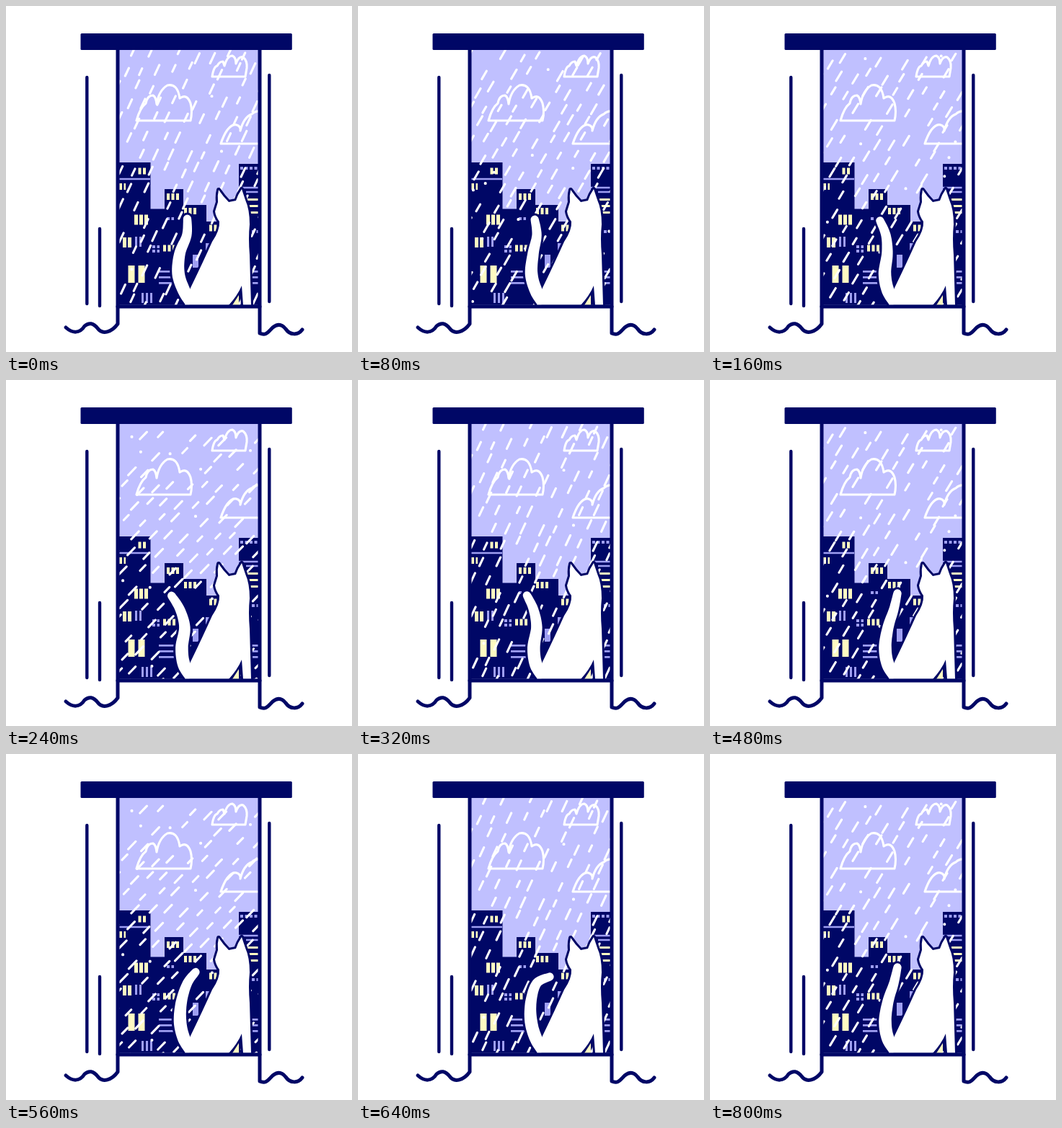
These frames come from a looping animation (480 by 480 pixels, 0.88 s). An HTML page:

```html
<!DOCTYPE html>
<html lang="en">
<head>
<meta charset="utf-8">
<title>Rainy window</title>
<style>
html, body { margin: 0; width: 100%; height: 100%; overflow: hidden; background: #fff; }
svg { display: block; width: 100vw; height: 100vh; }
path { stroke-linejoin: round; }
.navy { fill: #000766; }
.frame, .curtain { fill: none; stroke: #000766; stroke-width: 5; stroke-linecap: round; }
.curtain { stroke-width: 4.4; }
.cloud, .rain { fill: none; stroke: #fff; stroke-width: 3.1; stroke-linecap: round; }
.edge { fill: #000766; stroke: #000766; stroke-width: 6; }
.fur { fill: #fff; }

/* Windows are dashed strokes: stroke width is the height, dashes the panes */
.cream { stroke: #fffbc2; }
.lilac { stroke: #9f9ff2; }
.small { stroke-width: 9; stroke-dasharray: 4 2.5; }
.tall { stroke-width: 14; stroke-dasharray: 5 2; }
.big { stroke-width: 24; stroke-dasharray: 9 5; }
.dots { stroke-width: 4; stroke-dasharray: 4 2.5; }
.bars { stroke-width: 14; stroke-dasharray: 3 3; }
.ledge { stroke-width: 2.5; }
.door { stroke-width: 8; }
.blind { stroke-width: 27; stroke-dasharray: 2.8 5.2; }
.shutter { stroke-width: 16; stroke-dasharray: 3 6; }
</style>
</head>
<body>
<svg viewBox="0 0 480 480">
  <defs>
    <clipPath id="pane"><rect x="157" y="61" width="193.5" height="353.8"/></clipPath>
    <path id="body" d="M256 391 Q273 356 286 327 Q297 311 296 299 Q291 292 290 285 L294 272 Q293 263 295 255 Q301 264 309 272 L319 270 Q322 261 327 254 L332 269 Q338 282 338 303 Q336 322 338 345 L340 415 H329 L327 388 Q321 402 309 415 H248 Z"/>
    <path id="tail"/>
  </defs>
  <g clip-path="url(#pane)">
    <rect x="155" y="59" width="198" height="358" fill="#c0c0ff"/>
    <path class="navy" d="M155 217H200.5V281.5H220V254H246V276H278V299H323V219H353V417H155Z"/>
    <path class="cream small" d="M183.5 229h11M157 250.5h9M223 264.5h17M247 284.5h17M282 308h11M218 336h17"/>
    <path class="cream tall" d="M178 296.5h19M162 328h12"/>
    <path class="cream big" d="M169.5 372h23"/>
    <path class="cream shutter" d="M343 267v21"/>
    <path class="lilac dots" d="M325 225h24M203 334h10M203 340h10M223 295h10M341 313h10"/>
    <path class="lilac bars" d="M188 405h15M179 327h9"/>
    <path class="lilac ledge" d="M157 240h43M323 252h28M333 258h18"/>
    <path class="lilac door" d="M263 345v18M281 329v18"/>
    <path class="lilac blind" d="M225.5 367v19M351.5 367v19"/>
    <path class="cloud" d="M181 159 Q186 141 194 135 Q196 124 204 124 Q208 126 209 136 Q212 117 224 110 Q238 107 241 128 Q251 121 256 135 Q259 146 256 159 Z"/>
    <path class="cloud" d="M286 98 Q288 84 293 83 Q296 77 301 77 L303 83 Q307 69 314 69 Q319 71 319 80 Q323 69 329 71 Q335 76 334 86 L332 98 Z"/>
    <path class="cloud" d="M353 191 H298 Q302 179 307 172 Q314 163 320 165 Q326 167 325 173 Q330 154 341 150 Q346 145 353 146"/>
    <path class="rain" id="rain"/>
    <use href="#tail" class="edge"/>
    <use href="#body" class="edge"/>
    <use href="#tail" class="fur"/>
    <use href="#body" class="fur"/>
    <path fill="#fffbc2" d="M314 415 L323 401 V415 Z"/>
  </g>
  <rect class="navy" x="103.5" y="38" width="293.3" height="23" rx="1.5"/>
  <path class="frame" d="M155 61 V441 C147 452 134 457 127 447 Q118 436 109 444 C102 455 92 454 83 446"/>
  <path class="frame" d="M352 61 V454 C361 458 364 452 370 446 Q380 438 388 448 C394 457 405 457 411 449"/>
  <path class="frame" d="M155 417 H352"/>
  <path class="curtain" d="M112.3 99 V413 M130 309 V416 M365.3 96 V410"/>
</svg>
<script>
const STEP = 80, COUNT = 11;
const rain = document.getElementById('rain');
const tail = document.getElementById('tail');

const mix = (a, b, t) => a + (b - a) * t;
const smooth = t => t * t * (3 - 2 * t);
const point = (x, y) => `${x.toFixed(1)} ${y.toFixed(1)}`;

function random(seed) {
  return () => (seed = (seed * 16807) % 2147483647) / 2147483647;
}

// A jittered, staggered grid of slanted drops; some shrink to dots
function rainPath(degrees, sheet) {
  const rnd = random(7919e3 * (sheet + 3));
  const dx = -15 * Math.sin(degrees * Math.PI / 180);
  const dy = 15 * Math.cos(degrees * Math.PI / 180);
  let d = '';
  for (let row = 0; row < 16; row++) {
    for (let col = -1; col < 10; col++) {
      const x = 156 + col * 22 + (row * 13 + sheet * 6) % 22 + rnd() * 8 - 4;
      const y = 60 + row * 23 + sheet * 5 + rnd() * 12 - 6;
      const size = mix(0.6, 1.05, rnd()), kind = rnd();
      if (kind < 0.12) continue;
      d += 'M' + point(x, y) + (kind < 0.2 ? 'h.8v.8h-.8z' : 'l' + point(dx * size, dy * size));
    }
  }
  return d;
}

// Tail poses: tip x and y, then x of the centre line at three heights
const HEIGHTS = [318, 343, 371];
const rest = [252, 295, 251, 241, 239];
const left = [229, 299, 241, 248, 244];
const up = [260, 296, 255, 247, 243];
const curl = [266, 309, 248, 240, 240];
const sway = [[-0.3, rest], [3.3, left], [6, up], [8, curl], [10, up], [10.7, rest], [COUNT, rest]];

function poseAt(step) {
  const i = sway.findIndex(([time]) => time > step);
  const [t0, a] = sway[i - 1], [t1, b] = sway[i];
  const t = smooth((step - t0) / (t1 - t0));
  return a.map((v, n) => mix(v, b[n], t));
}

const spline = (a, b, c, d, t) =>
  b + t * (c - a + t * (2 * a - 5 * b + 4 * c - d + t * (3 * (b - c) + d - a))) / 2;

// Tapered outline around a smooth centre line
function tailPath([tipX, tipY, ...xs]) {
  const knots = [[tipX, tipY], ...xs.map((x, i) => [x, HEIGHTS[i]]), [247, 395], [258, 412]];
  const end = knots.length - 1, mid = [];
  const at = i => knots[Math.max(0, Math.min(end, i))];
  for (let i = 0; i < end; i++)
    for (let t = 0; t < 1; t += 1 / 8)
      mid.push([0, 1].map(n => spline(at(i - 1)[n], at(i)[n], at(i + 1)[n], at(i + 2)[n], t)));
  mid.push(knots[end]);

  const near = [], far = [];
  mid.forEach(([x, y], i) => {
    const p = mid[Math.max(0, i - 1)], q = mid[Math.min(mid.length - 1, i + 1)];
    const dx = q[0] - p[0], dy = q[1] - p[1];
    const k = mix(5.6, 8.8, Math.min(1, i / 24)) / Math.hypot(dx, dy);
    near.push(point(x - dy * k, y + dx * k));
    far.unshift(point(x + dy * k, y - dx * k));
  });
  return `M${near.join('L')}L${far.join('L')}A5.6 5.6 0 0 0 ${near[0]}Z`;
}

const sheets = [25, 30, 31, 44].map(rainPath);
const start = performance.now();
let shown = -1;

function tick() {
  const step = Math.floor((performance.now() - start) / STEP) % COUNT;
  if (step !== shown) {
    shown = step;
    rain.setAttribute('d', sheets[step % sheets.length]);
    tail.setAttribute('d', tailPath(poseAt(step)));
  }
  requestAnimationFrame(tick);
}
tick();
</script>
</body>
</html>
```
